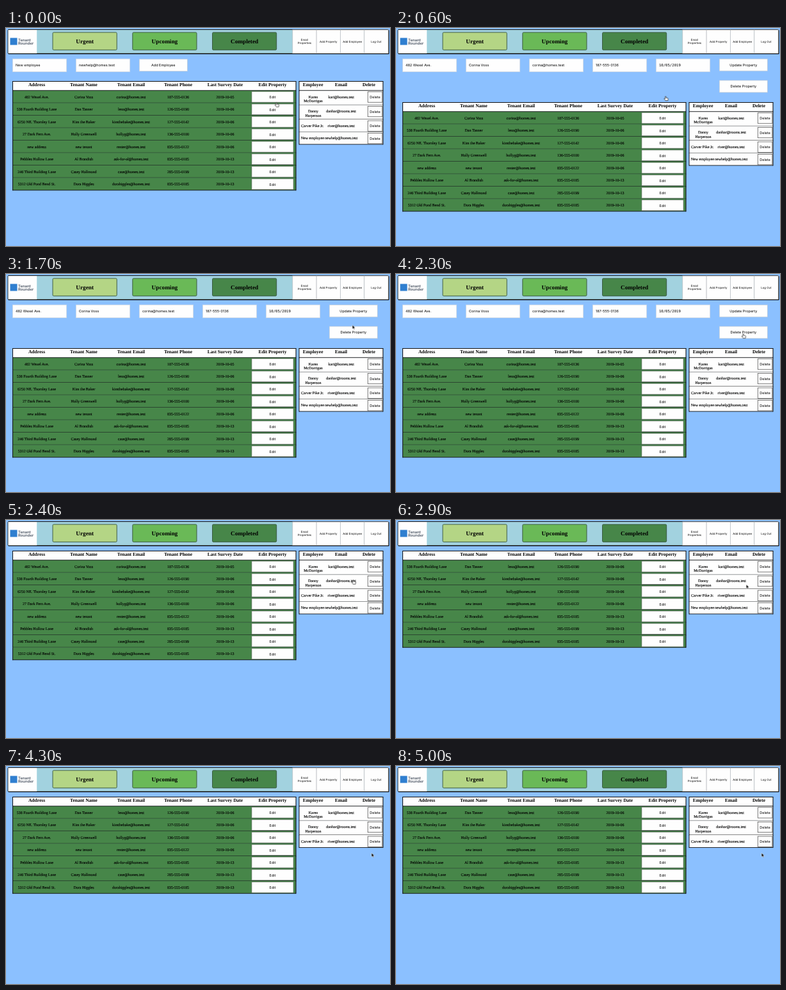
Write an HTML page that moves like this. It is 600 px wide and 341 px high and loops after 5.8 s.

```html
<!DOCTYPE html>
<html lang="en">
<head>
<meta charset="utf-8">
<title>Property dashboard</title>
<style>
html, body { margin: 0; width: 100%; height: 100%; overflow: hidden; background: #8bc0ff; }
svg { display: block; width: 600px; height: 341px; }
text { text-anchor: middle; fill: #000; text-rendering: geometricPrecision; }
.cell { font: 6px "Liberation Serif", serif; stroke: #000; stroke-width: 0.13px; }
.head { font: bold 7.5px "Liberation Serif", serif; }
.tab { font: bold 9.25px "Liberation Serif", serif; }
.ui { font: 5.5px Inter, sans-serif; }
.nav { font: 4.4px Inter, sans-serif; }
.date { font: 5.65px "DejaVu Sans Mono", monospace; }
.logo { font: 600 5.9px Inter, sans-serif; fill: #4b5563; }
.left { text-anchor: start; }
</style>
</head>
<body>
<svg id="stage" viewBox="0 0 600 341"></svg>
<script>
const LOOP = 5800;
const GREEN = '#478649', INK = '#111', PAPER = '#fefefe';
const stage = document.getElementById('stage');

function add(parent, tag, attrs, content) {
  const el = document.createElementNS('http://www.w3.org/2000/svg', tag);
  for (const key in attrs) el.setAttribute(key, attrs[key]);
  if (content) el.textContent = content;
  parent.appendChild(el);
  return el;
}
const group = (parent = stage) => add(parent, 'g', {});
const rect = (p, x, y, width, height, fill, more) =>
  add(p, 'rect', { x, y, width, height, fill, ...more });
const label = (p, x, y, text, cls) => add(p, 'text', { x, y, class: cls }, text);
const outline = (stroke, width = 1, rx = 0) => ({ stroke, 'stroke-width': width, rx });

// Each step is [ms, value]; values hold until the next step.
function play(el, prop, steps) {
  const frames = steps.map(([t, v]) => ({ offset: t / LOOP, [prop]: v, easing: 'step-end' }));
  frames.push({ offset: 1, [prop]: steps[steps.length - 1][1] });
  el.animate(frames, { duration: LOOP, iterations: Infinity });
}
const show = (el, from, to) => play(el, 'visibility',
  [...(from ? [[0, 'hidden']] : []), [from, 'visible'], ...(to < LOOP ? [[to, 'hidden']] : [])]);
const shiftY = y => `translate(0px, ${y}px)`;

// Top bar
function topBar() {
  const g = group();
  rect(g, 3.5, 3, 595.2, 38, '#111', { rx: 1 });
  rect(g, 3, 2.5, 594.5, 37.5, '#a2d2df', outline(INK, 1, 1));
  rect(g, 3.6, 3, 44.6, 36.5, PAPER);
  rect(g, 6.5, 15.5, 11, 11, '#2f7fd0');
  label(g, 19, 21.2, 'Tenant', 'logo left');
  label(g, 19, 26.2, 'Rounder', 'logo left');
  [['Urgent', 73, '#b4d585'], ['Upcoming', 197.8, '#6ab957'], ['Completed', 322.5, GREEN]]
    .forEach(([text, x, fill]) => {
      rect(g, x, 6.9, 100.2, 27.4, fill, outline('#34513a', 0.9, 1.5));
      label(g, x + 50.1, 24.2, text, 'tab');
    });
  [['Email', 'Properties'], ['Add Property'], ['Add Employee'], ['Log Out']].forEach((lines, i) => {
    const x = 447.8 + i * 37.35;
    rect(g, x, 3, 37.3, 36.6, PAPER, outline('#b9bcc0', 0.7));
    lines.forEach((text, k) =>
      label(g, x + 18.6, lines.length > 1 ? 20.3 + k * 4.8 : 22.9, text, 'nav'));
  });
}

// Forms
function input(g, x, text, cls = 'ui') {
  rect(g, x, 48.2, 84.4, 20.3, PAPER, outline('#c9d3df', 0.7));
  label(g, x + 4.6, 60, text, cls + ' left');
}
function button(g, x, y, text) {
  rect(g, x, y, 75, 18.8, PAPER, outline('#c3cad3', 0.7));
  label(g, x + 37.5, y + 11.2, text, 'ui');
}

const hire = group();
input(hire, 10.3, 'New employee');
input(hire, 109.3, 'newhelp@homes.test');
button(hire, 208.3, 48.8, 'Add Employee');

const edit = group();
['482 Wexel Ave.', 'Corina Voss', 'corina@homes.test', '187-555-0136']
  .forEach((text, i) => input(edit, 10.3 + i * 99, text));
input(edit, 406.3, '10/05/2019', 'date');
button(edit, 505.3, 48.3, 'Update Property');
button(edit, 505.3, 82, 'Delete Property');

// Tables
const tables = group();
const BODY = 97.8;

function frame(g, x, y, w, h, fill) {
  rect(g, x, y, w, h, fill);
  rect(g, x - 0.5, y, 1, h + 0.5, INK);
  rect(g, x + w - 0.5, y, 1.1, h + 0.5, INK);
  rect(g, x, y + h - 0.5, w, 0.9, INK);
}
function heading(x, w, titles) {
  frame(tables, x, 83.5, w, BODY - 83.5, PAPER);
  rect(tables, x - 0.5, 83, w + 1.1, 1, INK);
  titles.forEach(([text, cx]) => label(tables, cx, 90.9, text, 'head'));
}

const COLS = [48, 121.5, 195.5, 269, 342.5, 416.5];
const PITCH = 19.5;
const homes = [
  ['482 Wexel Ave.', 'Corina Voss', 'corina', '187-555-0136', '05'],
  ['538 Fourth Building Lane', 'Dan Tanner', 'lena', '126-555-0190', '06'],
  ['6250 NE. Thornley Lane', 'Kim the Baker', 'kimthebake', '127-555-0142', '06'],
  ['27 Dark Fern Ave.', 'Holly Greenwell', 'hollyg', '136-555-0100', '06'],
  ['new address', 'new tenant', 'renter', '835-555-0122', '06'],
  ['Pebbles Hollow Lane', 'Al Brandish', 'ask-for-al', '835-555-0185', '13'],
  ['246 Third Building Lane', 'Casey Hallmond', 'case', '285-555-0199', '13'],
  ['5312 Old Pond Bend St.', 'Dora Higgles', 'dorahiggles', '835-555-0185', '13']
];
const firstHome = group(tables), otherHomes = group(tables);
homes.forEach(([place, name, mail, phone, day], i) => {
  const g = i ? otherHomes : firstHome, y = BODY + i * PITCH;
  frame(g, 10.5, y, 442.5, PITCH, GREEN);
  [place, name, mail + '@homes.test', phone, '2019-10-' + day]
    .forEach((text, c) => label(g, COLS[c], y + 11.9, text, 'cell'));
  rect(g, 384, y + 1.7, 65, 16.6, PAPER, outline('#777', 0.6));
  label(g, COLS[5], y + 12.2, 'Edit', 'ui');
});
heading(10.5, 442.5, ['Address', 'Tenant Name', 'Tenant Email', 'Tenant Phone',
  'Last Survey Date', 'Edit Property'].map((text, i) => [text, COLS[i]]));

const staff = [
  [['Karen', 'McDorrigan'], 'kari@homes.test'],
  [['Danny', 'Harperson'], 'danhar@rooms.test'],
  [['Carver Pike Jr.'], 'river@homes.test'],
  [['New employee'], 'newhelp@homes.test']
];
let staffY = BODY, lastStaff;
staff.forEach(([names, mail]) => {
  const g = lastStaff = group(tables), y = staffY;
  const tall = names.length > 1, h = tall ? 22.6 : PITCH;
  frame(g, 458, y, 131, h, PAPER);
  names.forEach((text, k) =>
    label(g, tall ? 480 : 478.8, y + 11.9 + k * 6.6, text, 'cell'));
  label(g, 523.7, y + 11.9, mail, 'cell');
  rect(g, 565.3, y + 2, 22.6, 16.4, PAPER, outline('#444', 0.7));
  label(g, 576.6, y + 12.2, 'Delete', 'ui');
  staffY += h;
});
heading(458, 131, [['Employee', 479.7], ['Email', 523.5], ['Delete', 567]]);

topBar();

// Pointer
const pointer = group();
const arrow = add(pointer, 'path', {
  d: 'M0 0V6.2L1.4 4.9L2.4 7L3.4 6.5L2.4 4.5H4.3Z',
  fill: '#000', stroke: '#fff', 'stroke-width': 0.5
});
const hand = add(pointer, 'path', {
  d: 'M-.8 .2Q0-.7 .7 .2V2.2L3.3 2.8Q4 3 3.9 4L3.4 6.6H-.3L-2.4 3.7Q-2.2 2.8-1.4 3.4L-.8 3.9Z',
  fill: '#fff', stroke: '#111', 'stroke-width': 0.65
});

const path = [
  [0, 422.6, 116.8], [300, 421.5, 107], [700, 421.3, 107], [1100, 430.5, 102],
  [1500, 533, 83], [1700, 541.3, 79.8], [2100, 542.6, 93.8], [2800, 542.6, 93.8],
  [3400, 571.2, 136], [LOOP, 571.2, 136]
];
pointer.animate(path.map(([t, x, y], i) => {
  const next = path[i + 1];
  return {
    offset: t / LOOP,
    transform: `translate(${x}px, ${y}px)`,
    easing: next ? `steps(${(next[0] - t) / 100}, end)` : 'linear'
  };
}), { duration: LOOP, iterations: Infinity });

const kinds = [[0, 'hand'], [700, 'arrow'], [1900, 'hand'], [2800, 'arrow'], [3300, 'hand'], [4300, 'arrow']];
const seen = kind => kinds.map(([t, k]) => [t, k === kind ? 'visible' : 'hidden']);
play(arrow, 'visibility', seen('arrow'));
play(hand, 'visibility', seen('hand'));

// Page states
show(hire, 0, 600);
show(edit, 600, 2400);
play(tables, 'transform', [[0, shiftY(0)], [600, shiftY(33)], [2400, shiftY(-35)]]);
show(firstHome, 0, 2500);
play(otherHomes, 'transform', [[0, shiftY(0)], [2500, shiftY(-PITCH)]]);
show(lastStaff, 0, 4300);
</script>
</body>
</html>
```
